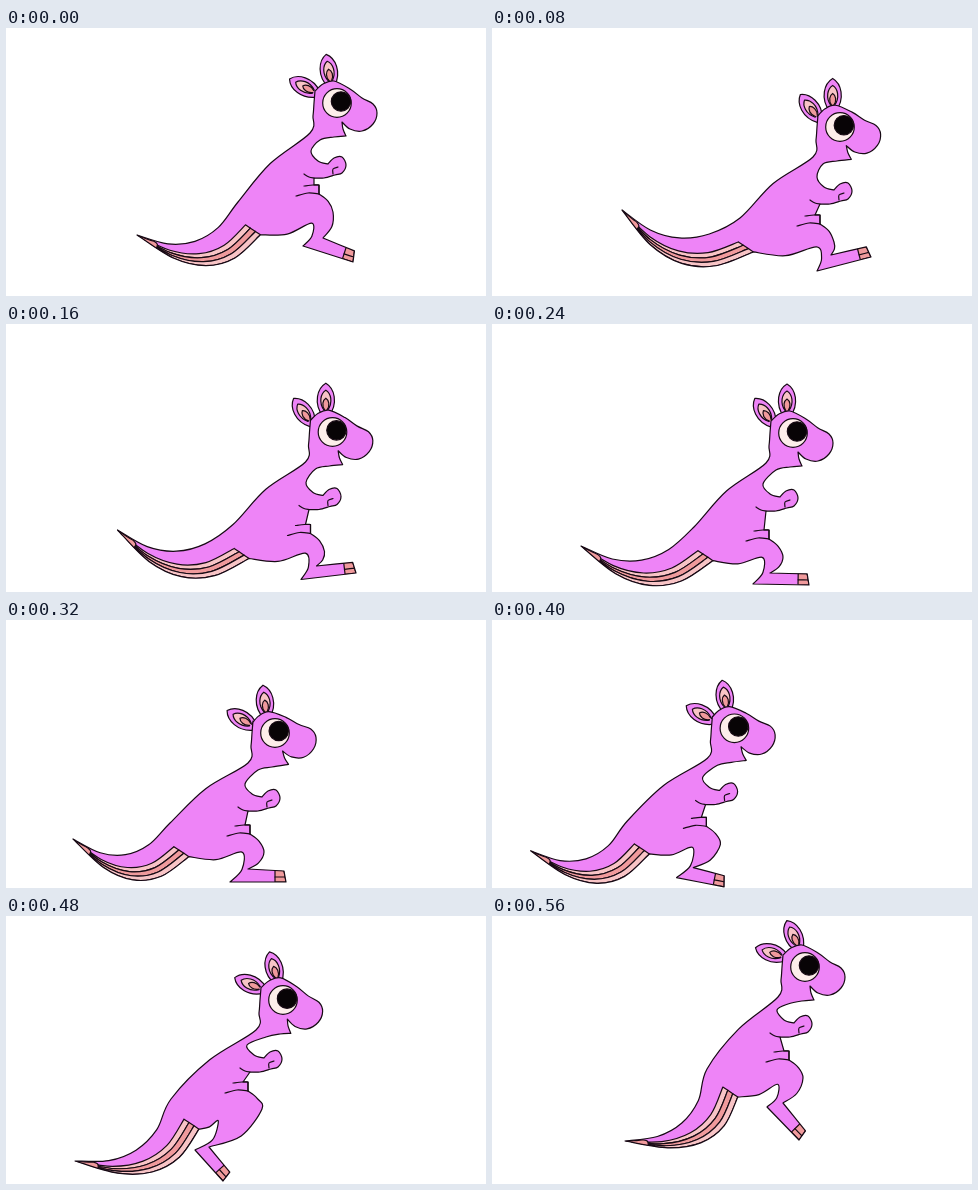
An HTML page with a canvas for the animation above (0.64 s loop, 480x268 px).

```html
<!DOCTYPE html>
<html lang="en">
<head>
<meta charset="utf-8">
<title>Hopping kangaroo</title>
<style>
  html, body { margin: 0; width: 100%; height: 100%; overflow: hidden; background: #fff; }
  canvas { display: block; }
</style>
</head>
<body>
<canvas id="stage" width="480" height="268"></canvas>
<script>
const ctx = document.getElementById('stage').getContext('2d');
const STEP = 80;
const INK = '#170a14', BODY = '#ee84f7', LIGHT = '#f8c4c6', SALMON = '#f09a9c';

// Joints of the skeleton; tilt in degrees, sweep is how far the ears blow back.
const push = {
  head: [331, 75], tilt: 0, sweep: 0.73, paw: [332, 138], waist: [232, 174], tip: [131, 207],
  pouch: [313, 157], ankle: [317, 210], heel: [297, 218], toe: [347, 234]
};
const reach = {
  head: [348, 99], tilt: -4, sweep: 0.05, paw: [352, 164], waist: [248, 190], tip: [130, 182],
  pouch: [328, 187], ankle: [339, 227], heel: [325, 243], toe: [379, 229]
};
const land = {
  head: [301, 109], tilt: 0, sweep: 0, paw: [298, 175], waist: [202, 203], tip: [89, 222],
  pouch: [277, 206], ankle: [278, 249], heel: [261, 260], toe: [317, 261]
};
const stand = {
  head: [269, 113], tilt: -8, sweep: 0.65, paw: [266, 179], waist: [164, 203], tip: [67, 219],
  pouch: [244, 205], ankle: [242, 249], heel: [224, 262], toe: [280, 262]
};
const spring = {
  head: [277, 84], tilt: 2, sweep: 0.87, paw: [268, 144], waist: [165, 183], tip: [69, 245],
  pouch: [242, 166], ankle: [203, 231], heel: [189, 234], toe: [217, 265]
};
const leap = {
  head: [313, 51], tilt: 0, sweep: 1, paw: [312, 109], waist: [215, 153], tip: [133, 225],
  pouch: [297, 135], ankle: [291, 187], heel: [275, 191], toe: [307, 224]
};

const lerp = (a, b, t) => a + (b - a) * t;
const mix = (p, q, t) => [lerp(p[0], q[0], t), lerp(p[1], q[1], t)];
const add = (p, dx, dy) => [p[0] + dx, p[1] + dy];
const along = (p, dir, d) => add(p, dir[0] * d, dir[1] * d);
const around = (p, offsets) => offsets.map(([dx, dy]) => add(p, dx, dy));
const reversed = pts => [...pts].reverse();

function normal(p, q) {
  const dx = q[0] - p[0], dy = q[1] - p[1], len = Math.hypot(dx, dy);
  return [dy / len, -dx / len];
}

// Midpoint of p and q, pushed sideways by a share of their distance.
const bulge = (p, q, k) =>
  along(mix(p, q, 0.5), normal(p, q), k * Math.hypot(q[0] - p[0], q[1] - p[1]));

function between(a, b, t, dx, dy) {
  const pose = {};
  for (const joint in a) {
    pose[joint] = Array.isArray(a[joint])
      ? add(mix(a[joint], b[joint], t), dx, dy)
      : lerp(a[joint], b[joint], t);
  }
  return pose;
}

const cycle = [
  push, reach, between(reach, land, 0.5, 2, 4), land,
  stand, between(stand, spring, 0.3, -29, 4), spring, leap
];

// Adds a smooth run through the points; consecutive runs meet in a corner.
function run(path, pts, start) {
  path[start ? 'moveTo' : 'lineTo'](...pts[0]);
  for (let i = 0; i < pts.length - 1; i++) {
    const p = pts[i], q = pts[i + 1];
    const before = pts[i - 1] || p, after = pts[i + 2] || q;
    path.bezierCurveTo(
      p[0] + (q[0] - before[0]) / 6, p[1] + (q[1] - before[1]) / 6,
      q[0] - (after[0] - p[0]) / 6, q[1] - (after[1] - p[1]) / 6, ...q);
  }
}

function shape(...runs) {
  const path = new Path2D();
  runs.forEach((pts, i) => run(path, pts, i === 0));
  return path;
}

function paint(path, fill, line = true) {
  if (fill) { ctx.fillStyle = fill; ctx.fill(path); }
  if (line) ctx.stroke(path);
}

function disc([x, y], r, fill) {
  const path = new Path2D();
  path.arc(x, y, r, 0, Math.PI * 2);
  paint(path, fill);
}

function leaf(from, to, width) {
  const path = new Path2D(), len = from - to;
  path.moveTo(0, to);
  for (const side of [-1, 1]) {
    path.moveTo(side * width * 0.35, from);
    path.bezierCurveTo(side * width * 1.5, from - len * 0.4, side * width, from - len * 0.85, 0, to);
    path.lineTo(0, from);
  }
  const edge = new Path2D();
  edge.moveTo(-width * 0.35, from);
  edge.bezierCurveTo(-width * 1.5, from - len * 0.4, -width, from - len * 0.85, 0, to);
  edge.bezierCurveTo(width, from - len * 0.85, width * 1.5, from - len * 0.4, width * 0.35, from);
  return edge;
}

function ear(base, degrees) {
  ctx.save();
  ctx.translate(...base);
  ctx.rotate(-degrees * Math.PI / 180);
  paint(leaf(3, -30, 8.5), BODY);
  paint(leaf(-3, -23, 5), LIGHT);
  paint(leaf(-3, -15, 3), SALMON);
  ctx.restore();
}

function draw({ head, tilt, sweep, paw, waist, tip, pouch, ankle, heel, toe }) {
  const c = Math.cos(tilt * Math.PI / 180), s = Math.sin(tilt * Math.PI / 180);
  const onHead = offsets => around(head, offsets.map(([x, y]) => [x * c - y * s, x * s + y * c]));

  // Every line of the tail is an arc from the rump to the tip, hanging to its own depth.
  const down = normal(waist, tip);
  const tailLine = (root, depth, from = 0) => {
    const hang = along(mix(waist, tip, 0.5), down, depth);
    return [0, 1, 2, 3, 4].map(i => {
      const t = lerp(from, 1, i / 4);
      return mix(mix(root, hang, t), mix(hang, tip, t), t);
    });
  };
  const root = along(waist, down, 24), rump = add(root, 15, 10);
  const stripe = t => tailLine(mix(root, rump, t), lerp(62, 82, t));

  const knee = add(pouch, 14, 27), hip = add(pouch, 0, 9);
  const hock = along(mix(ankle, knee, 0.35), normal(knee, ankle), -16);
  const up = normal(heel, toe), forward = [-up[1], up[0]];
  const toeTop = along(along(toe, up, 11), forward, -2);

  const nape = add(head, -27, 30);
  const back = [...around(head, [[-22, -12], [-23, 0], [-24, 13]]), nape,
                bulge(nape, waist, -0.055), ...tailLine(waist, 48)];
  const face = onHead([[-22, -12], [-14, -19], [-3, -22], [13, -14], [25, -5], [36, 1],
                       [40, 10], [36, 21], [25, 28], [13, 26], [5, 19]]);
  const chin = onHead([[5, 19], [6, 26], [9, 33]]);
  const throat = [chin[2], ...around(head, [[-3, 34], [-17, 37]]),
                  ...around(paw, [[-27, -15], [-20, -5], [-10, -2]])];
  const arm = around(paw, [[-10, -2], [-4, -8], [4, -9], [8, -1], [4, 7], [-3, 9], [-14, 12], [-24, 12]]);

  const outline = shape(
    back,
    reversed(tailLine(rump, 82)),
    [rump, bulge(rump, hock, -0.1), hock, bulge(hock, heel, 0.2), heel],
    [heel, toe],
    [toe, toeTop],
    [toeTop, ankle],
    reversed([hip, bulge(hip, knee, 0.12), knee, bulge(knee, ankle, 0.15), ankle]),
    [pouch, add(pouch, -5, 0)],
    reversed(arm),
    reversed(throat),
    reversed(chin),
    reversed(face));

  const [rear, front] = onHead([[-21, -10], [-6, -19]]);
  ear(rear, 35 + 37 * sweep);
  ear(front, 24 * sweep ** 3);

  paint(outline, BODY, false);
  ctx.save();
  ctx.clip(outline);
  [LIGHT, SALMON, LIGHT].forEach((tone, i) =>
    paint(shape(stripe(i / 3), reversed(stripe((i + 1) / 3)), [mix(root, rump, i / 3)]), tone));
  const upper = tailLine(waist, 48, 0.87), lower = tailLine(rump, 82, 0.87);
  paint(shape(upper, reversed(lower), [lower[0], bulge(lower[0], upper[0], -0.3), upper[0]]), SALMON);
  const cuff = along(toe, forward, -11), claw = along(toe, up, 5);
  paint(shape([toe, toeTop], [along(cuff, up, 14), cuff], [toe]), SALMON);
  paint(shape([along(cuff, up, 5), claw]));
  ctx.restore();

  paint(outline);
  paint(shape([add(pouch, -23, 11), add(pouch, -11, 8), hip]));
  paint(shape([add(pouch, -15, 1), add(pouch, -6, 0), pouch], [hip]));
  paint(shape(around(paw, [[-24, 12], [-29, 11], [-34, 8]])));
  paint(shape(around(paw, [[-5, 8], [-5, 3], [0, 1]])));

  disc(head, 14.3, '#fdeeea');
  disc(onHead([[4, -1.5]])[0], 9.7, '#080406');
}

ctx.lineWidth = 1.2;
ctx.strokeStyle = INK;
ctx.lineJoin = ctx.lineCap = 'round';

function tick() {
  ctx.clearRect(0, 0, 480, 268);
  draw(cycle[Math.floor(performance.now() / STEP) % cycle.length]);
  requestAnimationFrame(tick);
}
tick();
</script>
</body>
</html>
```
